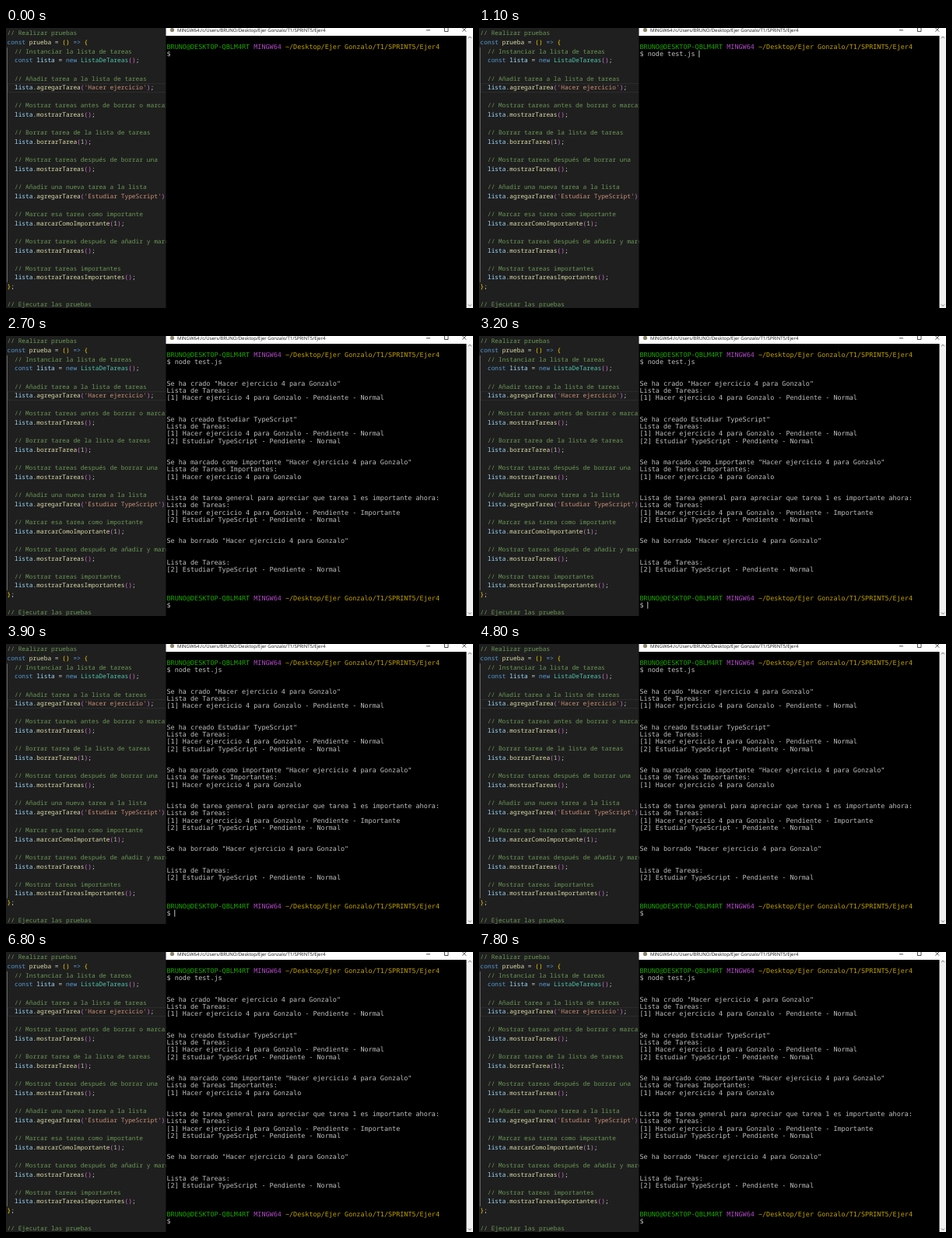
Animation of 600x360 px, one loop 7900 ms. Source, as an HTML page:

```html
<!DOCTYPE html>
<html lang="es">
<head>
<meta charset="utf-8">
<style>
  html, body { margin: 0; width: 100%; height: 100%; overflow: hidden; background: #1f1f1f; }
  svg { display: block; width: 600px; height: 360px; }
  text { white-space: pre; text-rendering: geometricPrecision; }
  #editor { font: 500 7.86px "Noto Sans Mono", monospace; }
  #term { font: 8.45px "DejaVu Sans Mono", monospace; fill: #bfbfbf; }
  #title { font: 6px "Open Sans", sans-serif; fill: #111; }
</style>
</head>
<body>
<svg viewBox="0 0 600 360">
  <rect width="600" height="360" fill="#1f1f1f"/>
  <rect x="2.5" y="71.5" width="210" height="11" fill="none" stroke="#2b2b2b"/>
  <path d="M1.5 25V327" stroke="#666"/>
  <g id="editor"></g>
  <rect x="205.5" width="395" height="360"/>
  <rect x="205.5" width="395" height="10" fill="#fff"/>
  <rect x="591.5" y="10" width="9" height="350" fill="#f0f0f0"/>
  <circle cx="213.5" cy="2.5" r="2.6" fill="#8a8468"/>
  <text id="title" x="220" y="4.9"></text>
  <path d="M540 2.8h5M563.5 0v4.5h4.5V0M586.5 0l4.6 4.6M591 0l-4.6 4.6" fill="none" stroke="#222" stroke-width=".8"/>
  <path d="M594 13.2l2-2 2 2M594 355.5l2 2 2-2" fill="none" stroke="#555" stroke-width=".8"/>
  <g id="term">
    <g id="prompt"></g>
    <text id="command" x="206.5" y="36.4"></text>
    <g id="output"></g>
    <rect id="cursor" width="1" height="9"/>
  </g>
</svg>
<script>
const $ = id => document.getElementById(id);
const LOOP = 7900, COL = 5.087, ROW = 9.2, LEFT = 206.5;
const USER = 'BRUNO', FOLDER = 'Gonzalo', PATH = `Desktop/Ejer ${FOLDER}/T1/SPRINT5/Ejer4`;

// Appends one line of [text, colour] parts.
function addLine(parent, x, y, parts) {
  const line = document.createElementNS('http://www.w3.org/2000/svg', 'text');
  line.setAttribute('x', x);
  line.setAttribute('y', y);
  for (const [text, colour] of parts) {
    const span = document.createElementNS(line.namespaceURI, 'tspan');
    span.textContent = text;
    if (colour) span.setAttribute('fill', colour);
    line.append(span);
  }
  parent.append(line);
}

const code = `// Realizar pruebas
const prueba = () => {
  // Instanciar la lista de tareas
  const lista = new ListaDeTareas();

  // Añadir tarea a la lista de tareas
  lista.agregarTarea('Hacer ejercicio');

  // Mostrar tareas antes de borrar o marcar
  lista.mostrarTareas();

  // Borrar tarea de la lista de tareas
  lista.borrarTarea(1);

  // Mostrar tareas después de borrar una
  lista.mostrarTareas();

  // Añadir una nueva tarea a la lista
  lista.agregarTarea('Estudiar TypeScript');

  // Marcar esa tarea como importante
  lista.marcarComoImportante(1);

  // Mostrar tareas después de añadir y marcar
  lista.mostrarTareas();

  // Mostrar tareas importantes
  lista.mostrarTareasImportantes();
};

// Ejecutar las pruebas`;

const brackets = ['#ffd700', '#da70d6'];
let depth = 0;
function colourOf(token) {
  if (token.startsWith('//')) return '#6a9955';
  if (token[0] === "'") return '#ce9178';
  if (/^(const|new|=>)$/.test(token)) return '#569cd6';
  if (/[({]/.test(token)) return brackets[depth++];
  if (/[)}]/.test(token)) return brackets[--depth];
  if (/^\d/.test(token)) return '#b5cea8';
  if (/^[A-Z]/.test(token)) return '#4ec9b0';
  if (token === 'lista') return '#9cdcfe';
  return /^\w/.test(token) ? '#dcdcaa' : '#d4d4d4';
}
code.split('\n').forEach((line, i) => {
  const tokens = line.match(/\/\/.*|'.*?'|\w+|=>|\s+|./g) || [];
  addLine($('editor'), 1.5, 9.4 + i * 11.633, tokens.map(t => [t, colourOf(t)]));
});

const rowY = row => 27.2 + row * ROW;
const addPrompt = (parent, row) => addLine(parent, LEFT, rowY(row), [
  [USER + '@DESKTOP-QBLM4RT ', '#1ca800'], ['MINGW64 ', '#b148c6'], ['~/' + PATH, '#c0a000']
]);

const first = `[1] Hacer ejercicio 4 para ${FOLDER}`;
const second = '[2] Estudiar TypeScript - Pendiente - Normal';
const output = `Se ha crado "Hacer ejercicio 4 para ${FOLDER}"
Lista de Tareas:
${first} - Pendiente - Normal


Se ha creado Estudiar TypeScript"
Lista de Tareas:
${first} - Pendiente - Normal
${second}


Se ha marcado como importante "Hacer ejercicio 4 para ${FOLDER}"
Lista de Tareas Importantes:
${first}


Lista de tarea general para apreciar que tarea 1 es importante ahora:
Lista de Tareas:
${first} - Pendiente - Importante
${second}


Se ha borrado "Hacer ejercicio 4 para ${FOLDER}"


Lista de Tareas:
${second}`;

$('title').textContent = `MINGW64:/c/Users/${USER}/${PATH}`;
addPrompt($('prompt'), 0);
output.split('\n').forEach((line, i) => addLine($('output'), LEFT, rowY(i + 4), [[line]]));
addPrompt($('output'), 34);
addLine($('output'), LEFT, rowY(35), [['$']]);

// The last letters arrive at once through tab completion.
const COMMAND = 'node test.js ', TYPE = 300, KEY = 85, TAB = 1000, ENTER = 1500, DONE = 1700;

function draw(t) {
  const typed = t >= TAB ? COMMAND.length : Math.min(7, Math.max(0, Math.ceil((t - TYPE) / KEY)));
  const done = t >= DONE;
  $('command').textContent = '$ ' + COMMAND.slice(0, typed);
  $('output').style.display = done ? '' : 'none';

  const [row, col] = done ? [35, 2] : t >= ENTER ? [2, 0] : [1, 2 + typed];
  const reset = done ? DONE : t >= ENTER ? ENTER : t >= TAB ? TAB : t;
  const visible = t >= TYPE && (t - reset) % 1060 < 530;
  $('cursor').setAttribute('x', LEFT + col * COL - .4);
  $('cursor').setAttribute('y', 19.6 + row * ROW);
  $('cursor').style.display = visible ? '' : 'none';
}

const start = performance.now();
(function tick() {
  draw((performance.now() - start) % LOOP);
  requestAnimationFrame(tick);
})();
</script>
</body>
</html>
```
